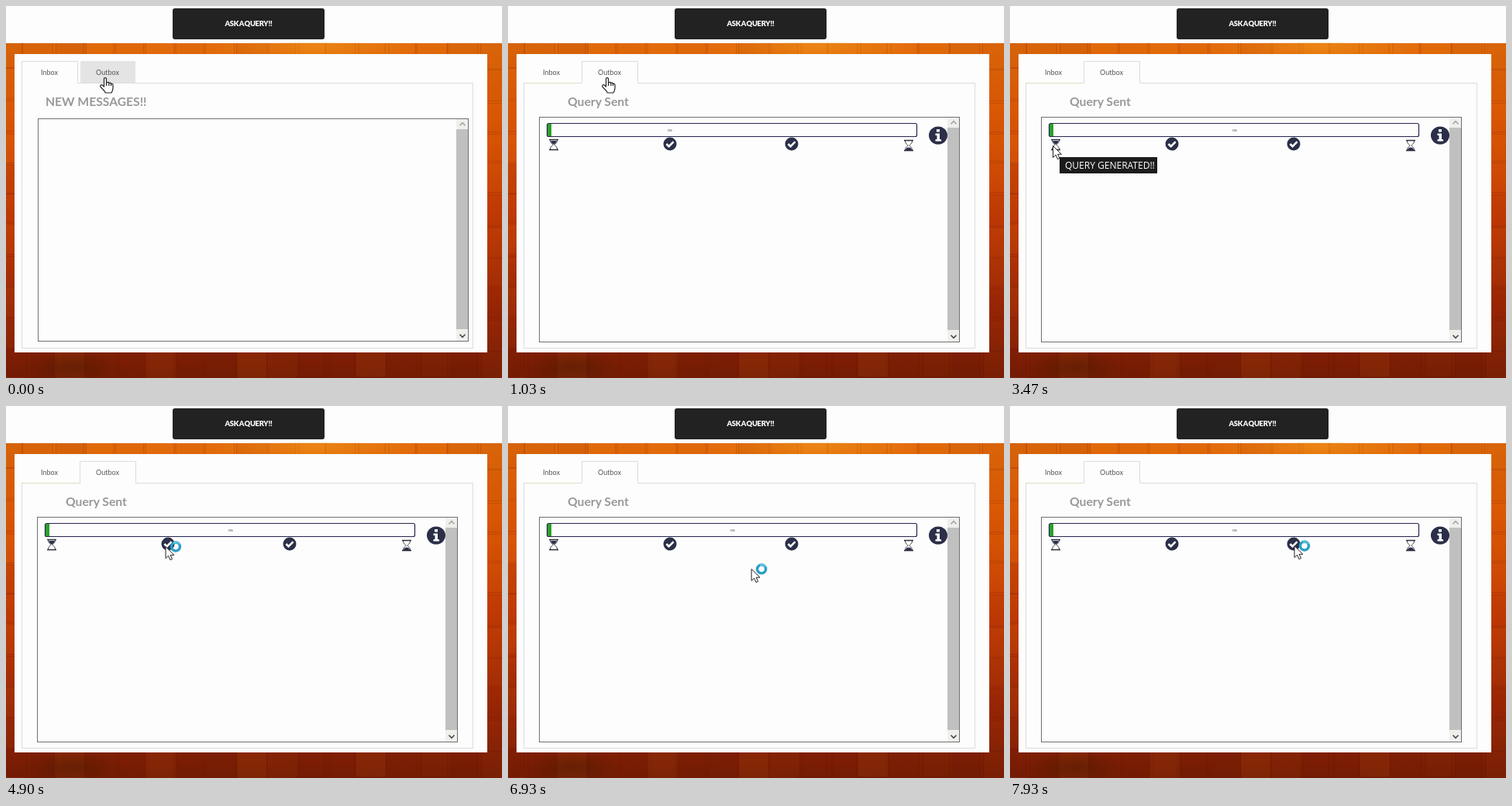
An HTML page that plays this animation: 640 by 480 pixels, repeating every 8000 ms.

```html
<!DOCTYPE html>
<html lang="en">
<head>
<meta charset="utf-8">
<title>Query outbox</title>
<style>
html, body { margin: 0; width: 100%; height: 100%; overflow: hidden; background: #fdfdfd; }
svg { display: block; width: 100vw; height: 100vh; }
text { font-family: Lato, sans-serif; }
.tab { font-size: 9px; fill: #555; text-anchor: middle; }
.head { font-size: 15.7px; font-weight: 700; fill: #999; }
.line { fill: none; stroke: #dcdce0; }
.tip text { font: 12px "Open Sans", sans-serif; fill: #fff; }
</style>
</head>
<body>
<svg viewBox="0 0 640 480" preserveAspectRatio="none">
  <defs>
    <linearGradient id="fire" x1="0" y1="0" x2="0" y2="1">
      <stop offset="0" stop-color="#e06a0a"/>
      <stop offset=".2" stop-color="#dd5a04"/>
      <stop offset=".5" stop-color="#c23c04"/>
      <stop offset=".8" stop-color="#942404"/>
      <stop offset="1" stop-color="#741c04"/>
    </linearGradient>
    <radialGradient id="glow">
      <stop offset="0" stop-color="#f59a1c" stop-opacity=".55"/>
      <stop offset="1" stop-color="#f59a1c" stop-opacity="0"/>
    </radialGradient>
    <radialGradient id="shade">
      <stop offset="0" stop-color="#421800" stop-opacity=".45"/>
      <stop offset="1" stop-color="#421800" stop-opacity="0"/>
    </radialGradient>
    <g id="check">
      <circle r="8.5" fill="#2b2f48"/>
      <path d="M-4.6 0L-1.4 3.2L4.6-2.8" fill="none" stroke="#fff" stroke-width="2.6"/>
    </g>
    <g id="glass" fill="none" stroke="#30303c">
      <path d="M-6-6.5H6M-6 6.5H6" stroke-width="1.4"/>
      <path d="M-4.5-6C-4.5-2-1-1-1 0S-4.5 2-4.5 6M4.5-6C4.5-2 1-1 1 0S4.5 2 4.5 6"/>
    </g>
  </defs>

  <rect width="640" height="480" fill="#fdfdfd"/>
  <rect y="48" width="640" height="432" fill="url(#fire)"/>
  <g id="tiles"></g>
  <ellipse cx="400" cy="52" rx="130" ry="24" fill="url(#glow)"/>
  <ellipse cx="85" cy="466" rx="65" ry="22" fill="url(#shade)"/>
  <rect width="640" height="47.5" fill="#fdfdfd"/>
  <rect x="215" y="3" width="196" height="40" rx="3" fill="#222"/>
  <text x="313" y="26" text-anchor="middle" font-size="9.4" font-weight="900" letter-spacing="-.3" word-spacing="-1" fill="#fff">ASK A QUERY !!</text>
  <rect x="11" y="62" width="610" height="385" fill="#fdfdfd"/>
  <rect class="line" x="20.5" y="99.5" width="582" height="342"/>

  <g id="inbox">
    <path d="M20.5 99.5V71.5H92.5V99.5" class="line"/>
    <path d="M21 99.5H92" stroke="#fdfdfd" stroke-width="2"/>
    <rect x="96" y="71" width="71" height="28" fill="#e4e4e4"/>
    <text class="head" x="51" y="129">NEW MESSAGES!!</text>
    <g class="list" data-box="41 145 597 433"></g>
  </g>

  <g id="outbox">
    <path d="M20 99.5H92" stroke="#dedec4"/>
    <path d="M95.5 99.5V71.5H167.5V99.5" class="line"/>
    <path d="M96 99.5H167" stroke="#fdfdfd" stroke-width="2"/>
    <text class="head" x="77" y="129">Query Sent</text>
    <g class="list" data-box="40 143 583 434"></g>
    <rect x="50.5" y="151.5" width="477" height="17" rx="2" fill="#fdfdfd" stroke="#26264e" stroke-width="1.2"/>
    <rect x="51" y="152" width="5" height="16" fill="#2ba02b"/>
    <text id="percent" y="162" font-size="4.5" text-anchor="middle" fill="#444">0%</text>
    <use href="#glass" x="59" y="179"/>
    <path d="M55 174H63Q62 177 59.5 178.5H58.5Q56 177 55 174Z" fill="#2b2f48"/>
    <use href="#check" x="209" y="178"/>
    <use href="#check" x="366" y="178"/>
    <use href="#glass" x="517" y="180"/>
    <path d="M513 186Q513.5 182.5 517 182.5T521 186Z" fill="#2b2f48"/>
    <ellipse cx="555" cy="167" rx="12" ry="11.5" fill="#2b2f48"/>
    <path d="M553 159H557V162.5H553ZM551.5 164.5H557V172H559V174.5H551.5V172H553.5V167H551.5Z" fill="#fff"/>
  </g>

  <text class="tab" x="56" y="89">Inbox</text>
  <text class="tab" x="131" y="89">Outbox</text>

  <g class="tip" id="tip1"><rect x="64" y="195" width="126" height="21" fill="#1c1c1c"/><text x="71" y="210">QUERY GENERATED!!</text></g>
  <g class="tip" id="tip2"><rect x="216" y="195" width="87" height="21" fill="#1c1c1c"/><text x="223" y="210">QUERY SENT!!</text></g>

  <g id="hand" transform="translate(121 92)" fill="#fff" stroke="#222" stroke-width="1.2" stroke-linejoin="round">
    <path d="M5.5 12V2Q5.500.6 7 .6T8.5 2V7Q11.5 5.5 11.8 7.5Q14.3 6.3 14.5 8.5Q17 7.8 17 10V14Q17 16.5 15 20H7.5Q6 17 1.5 13Q-.2 10.6 1.8 9.7Q3 9.5 5.5 12Z"/>
    <path d="M8.5 7V11M11.8 7.5V11M14.5 8.5V11" fill="none"/>
  </g>
  <g id="arrow">
    <path d="M.5.5V15.5L4 12.2L6.4 17.6L9 16.5L6.6 11.300H11.4Z" fill="#fff" stroke="#222" stroke-linejoin="round"/>
    <g id="busy" fill="none" transform="translate(13.5 .5)">
      <circle r="5.5" stroke="#2a9fc6" stroke-width="3.4"/>
      <path id="spark" d="M0-5.5A5.5 5.5 0 0 1 5.5 0" stroke="#62c4df" stroke-width="2"/>
    </g>
  </g>
</svg>
<script>
const LOOP = 8000;
const $ = id => document.getElementById(id);
const clamp = v => Math.max(0, Math.min(1, v));
const ease = v => v * v * (3 - 2 * v);

// Cursor stops: time, x, y
const path = [
  [1930, 128, 93], [2200, 61, 183], [2800, 61, 183], [2830, 55, 180],
  [4899, 55, 180], [4900, 205.5, 181], [6400, 205.5, 181], [6700, 248, 239],
  [6930, 313.5, 210], [7300, 364, 181], [7530, 366.5, 180]
];

function cursorAt(t) {
  const i = path.findIndex(p => p[0] > t);
  if (i < 0) return path[path.length - 1].slice(1);
  if (i === 0) return path[0].slice(1);
  const [a, b] = [path[i - 1], path[i]];
  const k = b[0] - a[0] <= 30 ? 0 : (t - a[0]) / (b[0] - a[0]);
  return [1, 2].map(n => a[n] + (b[n] - a[n]) * k);
}

function buildTiles() {
  let seed = 17, out = "";
  const rnd = () => (seed = seed * 16807 % 2147483647) / 2147483647;
  for (let y = 38; y < 480; y += 40) {
    for (let x = -18; x < 640; x += 39) {
      const dx = rnd() * 8, dy = rnd() * 8;
      const tone = rnd() < .5 ? "#f08a20" : "#601804";
      out += `<rect x="${x + dx}" y="${y + dy}" width="39" height="40" fill="${tone}" fill-opacity="${rnd() * .1}" stroke="#601804" stroke-opacity=".2"/>`;
    }
  }
  $("tiles").innerHTML = out;
}

function buildList(g) {
  const [l, t, r, b] = g.dataset.box.split(" ").map(Number);
  const x = r - 16, mid = r - 8;
  const chevron = (y, d, color) =>
    `<path d="M${mid - 3.5} ${y + d}L${mid} ${y - d}L${mid + 3.5} ${y + d}" fill="none" stroke="${color}" stroke-width="1.6"/>`;
  g.innerHTML = `<rect x="${x}" y="${t + 1}" width="15" height="${b - t - 2}" fill="#efefec"/>
    <rect x="${x}" y="${t + 14}" width="15" height="${b - t - 30}" fill="#c0c0c0"/>
    ${chevron(t + 7.5, 1.8, "#a4a4a4")}${chevron(b - 7.5, -1.8, "#484848")}
    <rect x="${l + .5}" y="${t + .5}" width="${r - l - 1}" height="${b - t - 1}" fill="none" stroke="#707070"/>`;
}

const show = (id, on) => $(id).style.display = on ? "" : "none";

function draw(t) {
  const sent = t >= 1030;
  show("inbox", !sent);
  show("outbox", sent);
  $("percent").setAttribute("x", 209 + 81 * ease(clamp((t - 1070) / 430)));

  show("hand", t < 1930);
  show("arrow", t >= 1930);
  show("busy", t >= 4900);
  $("arrow").setAttribute("transform", `translate(${cursorAt(t)})`);
  $("spark").setAttribute("transform", `rotate(${t * .36 % 360})`);

  show("tip1", t >= 3430 && t < 4900);
  show("tip2", t >= 5500 && t < 6430);
  $("tip1").style.opacity = clamp(.5 + (t - 3430) / 80);
  $("tip2").style.opacity = clamp(.3 + (t - 5500) / 100);
}

buildTiles();
document.querySelectorAll(".list").forEach(buildList);
const start = performance.now();
function tick() {
  draw((performance.now() - start) % LOOP);
  requestAnimationFrame(tick);
}
tick();
</script>
</body>
</html>
```
